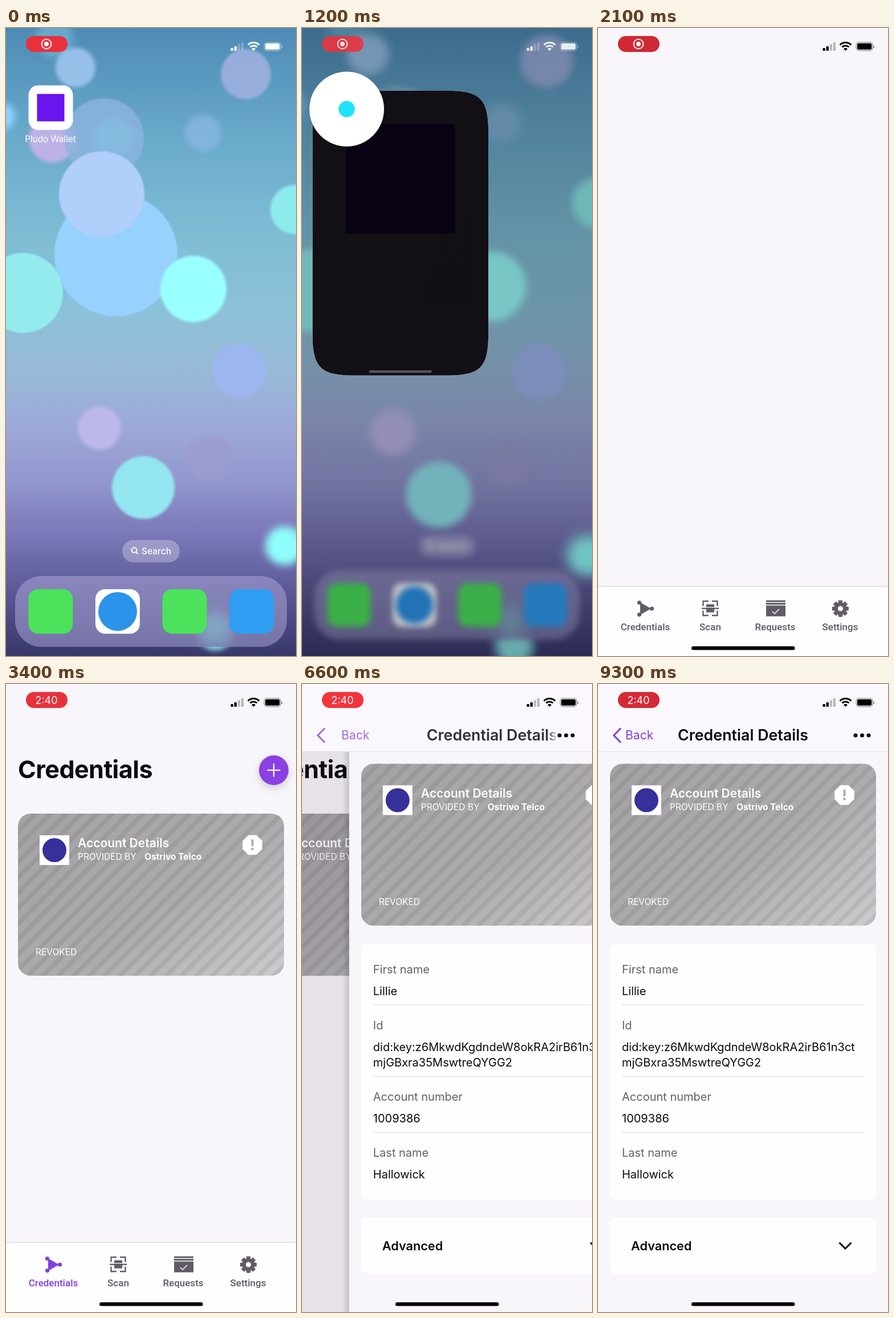
Animation of 509x1100 px, one loop 9400 ms. Source, as an HTML page with a canvas:

```html
<!DOCTYPE html>
<html lang="en">
<head>
<meta charset="utf-8">
<title>Wallet credential walkthrough</title>
<style>
html, body { margin: 0; width: 100%; height: 100%; overflow: hidden; }
canvas { display: block; }
</style>
</head>
<body>
<canvas id="stage" width="509" height="1100"></canvas>
<script>
const W = 509, H = 1100, LOOP = 9400, STEP = 100;
const c = document.getElementById('stage').getContext('2d');
const PURPLE = '#8040e0', INK = '#0d0a12', PAGE = '#f8f6fa', PANEL = '#fefdff', GREY = '#5f5c67';

const clamp = v => Math.max(0, Math.min(1, v));
const ramp = (t, a, b) => clamp((t - a) / (b - a));
const mix = (a, b, k) => a + (b - a) * k;
// Critically damped spring from 0 to 1; t in ms.
const spring = (t, start, k) => {
  const s = Math.max(0, t - start) / 1000 * k;
  return 1 - (1 + s) * Math.exp(-s);
};

function layer(draw, { x = 0, y = 0, scale = 1, alpha = 1 } = {}) {
  c.save();
  c.translate(x, y);
  c.scale(scale, scale);
  c.globalAlpha *= alpha;
  draw();
  c.restore();
}
const zoom = (k, draw) => layer(draw, { x: W / 2 * (1 - k), y: H / 2 * (1 - k), scale: k });

function box(x, y, w, h, fill, r = 0) {
  c.fillStyle = fill;
  c.beginPath();
  c.roundRect(x, y, w, h, r);
  c.fill();
}
function disc(x, y, r, fill) {
  c.fillStyle = fill;
  c.beginPath();
  c.arc(x, y, r, 0, 7);
  c.fill();
}
// Rectangle path with continuous-curvature corners.
function smoothRect(x, y, w, h, r) {
  const e = r * 1.528, n = e * .18, x2 = x + w, y2 = y + h;
  c.beginPath();
  c.moveTo(x + e, y);
  c.lineTo(x2 - e, y);
  c.bezierCurveTo(x2 - n, y, x2, y + n, x2, y + e);
  c.lineTo(x2, y2 - e);
  c.bezierCurveTo(x2, y2 - n, x2 - n, y2, x2 - e, y2);
  c.lineTo(x + e, y2);
  c.bezierCurveTo(x + n, y2, x, y2 - n, x, y2 - e);
  c.lineTo(x, y + e);
  c.bezierCurveTo(x, y + n, x + n, y, x + e, y);
}
function path(points, width, color, close) {
  c.beginPath();
  points.forEach(([x, y]) => c.lineTo(x, y));
  if (close) c.closePath();
  if (width) {
    c.lineWidth = width;
    c.strokeStyle = color;
    c.stroke();
  } else {
    c.fillStyle = color;
    c.fill();
  }
}
function text(s, x, y, size, color, { weight = 400, align = 'left', font = 'Inter', spacing = 0 } = {}) {
  c.font = `${weight} ${size}px ${font}, sans-serif`;
  c.textAlign = align;
  c.letterSpacing = spacing + 'px';
  c.fillStyle = color;
  c.fillText(s, x, y);
}
function gradient(x0, y0, x1, y1, ...stops) {
  const g = c.createLinearGradient(x0, y0, x1, y1);
  stops.forEach(([at, color]) => g.addColorStop(at, color));
  return g;
}

function statusBar(t, color) {
  const glow = .5 + .5 * Math.cos((t - 4800) / 1700 * 2 * Math.PI);
  box(35, 14, 73, 28, `rgb(${mix(205, 244, glow)},${mix(40, 52, glow)},${mix(51, 62, glow)})`, 14);
  if (t < 2900) {
    c.lineWidth = 1.9;
    c.strokeStyle = '#fff';
    c.beginPath();
    c.arc(71, 28, 8.4, 0, 7);
    c.stroke();
    disc(71, 28, 3.9, '#fff');
  } else {
    text('2:40', 71, 34.5, 18, '#fff', { align: 'center' });
  }
  [5, 8, 12, 15].forEach((h, i) => layer(
    () => box(394.5 + i * 6.1, 40 - h, 4.3, h, color, 1.2), { alpha: i < 2 ? 1 : .25 }));
  c.strokeStyle = color;
  c.lineWidth = 3;
  [14, 8.6].forEach(r => {
    c.beginPath();
    c.arc(434.5, 39.5, r, -Math.PI * .75, -Math.PI * .25);
    c.stroke();
  });
  c.fillStyle = color;
  c.beginPath();
  c.moveTo(434.5, 40);
  c.arc(434.5, 40, 5, -Math.PI * .75, -Math.PI * .25);
  c.fill();
  layer(() => {
    c.lineWidth = 1.2;
    c.beginPath();
    c.roundRect(453.3, 25, 28.7, 14.6, 4.2);
    c.stroke();
    box(483.3, 30, 1.7, 5, color, 1);
  }, { alpha: .45 });
  box(455, 26.8, 25.3, 11, color, 2.6);
}

const bubbles = [ // x, y, radius, softness, colour
  [85, 18, 33, 6, '#78bbd999'], [122, 69, 35, 3, '#a3c8f0d9'], [421, 81, 44, 2, '#a3b2e1d9'],
  [346, 184, 32, 5, '#8cb9e1b3'], [-8, 155, 24, 6, '#8fd0ff'], [82, 194, 42, 3, '#bcb2e6'],
  [172, 193, 70, 1, '#8db4dfcc'], [190, 192, 35, 5, '#86bde2cc'], [193, 397, 108, 1, '#97d1fd'],
  [168, 291, 75, 1, '#b0cffa'], [507, 318, 43, 2, '#8eebec'], [30, 464, 70, 1, '#94ebee'],
  [329, 457, 58, 2, '#9affff'], [409, 600, 47, 1, '#a0b6f2e0'], [164, 701, 38, 3, '#bdb8ea'],
  [357, 754, 40, 2, '#9d9cd0b0'], [241, 805, 55, 2, '#93e6f0'], [489, 907, 34, 7, '#8ffdfc'],
  [367, 1058, 32, 4, '#86dbe0']
];

function home(t, p) {
  box(0, 0, W, H, gradient(0, 0, 0, H, [0, '#4d8bb6'], [.17, '#69a9ca'], [.33, '#7fbdd5'],
    [.45, '#8cc1d9'], [.55, '#98b9d8'], [.63, '#9daad9'], [.72, '#9397cf'], [.82, '#7673b4'],
    [.9, '#5a5795'], [1, '#37376b']));
  zoom(1 + .09 * p, () => bubbles.forEach(([x, y, r, soft, color]) => {
    c.filter = `blur(${soft + 8 * p}px)`;
    disc(x, y, r, color);
  }));
  zoom(1 - .045 * p, () => {
    const blur = p ? `blur(${10 * p}px)` : 'none';
    c.filter = blur;
    box(204, 897, 101, 39, '#ffffff48', 19.5);
    c.strokeStyle = '#fff';
    c.lineWidth = 2;
    c.beginPath();
    c.arc(225, 914.5, 4.4, 0, 7);
    c.stroke();
    path([[228.3, 918], [232, 921.7]], 2.2, '#fff');
    text('Search', 238, 922, 15.5, '#fff', { weight: 500 });
    box(16, 960, 477, 124, gradient(0, 960, 0, 1084, [0, '#8d89c0ee'], [1, '#7a78aaee']), 46);
    c.filter = 'blur(16px)';
    disc(367, 1050, 26, '#86dbe088');
    c.filter = blur;
    ['#4ce25c', '#fff', '#4ce25c', '#2f9df2'].forEach((fill, i) =>
      box(39.3 + i * 117.6, 983, 78, 78, fill, 17));
    disc(196, 1022, 34, '#2c93ea');
    if (!p) {
      box(39.5, 100.5, 78, 78, '#fff', 17);
      box(54.5, 115.5, 48, 48, '#6a14ee');
      text('Pludo Wallet', 78, 200, 15.3, '#fff', { align: 'center' });
    }
  });
  layer(() => box(0, 0, W, H, '#000'), { alpha: .5 * p ** 1.3 });
}

function trianglePattern() {
  c.save();
  c.beginPath();
  c.rect(160, 355, 300.5, 402);
  c.clip();
  for (let row = 0; row < 12; row++) {
    for (let col = 0; col < 9; col++) {
      const x = 464.1 - col * 42 - (row % 2 ? 0 : 21), y = 369 + row * 36.4;
      c.globalAlpha = clamp(((x - 430) * 395 + (y - 350) * 270) / 478 / 430);
      disc(x, y, 2.2, '#444');
      for (const [dx, dy] of [[42, 0], [21, 36.4], [-21, 36.4]]) {
        path([[x + dx * .24, y + dy * .24], [x + dx * .76, y + dy * .76]], 1.8, '#444');
      }
    }
  }
  c.restore();
}

function appWindow(t, p) {
  const w = mix(78, W, p), h = mix(78, H, p ** 1.42);
  const x = mix(78.5, W / 2, p) - w / 2, y = mix(139.5, H / 2, p) - h / 2;
  const k = w / W, shown = ramp(t, 1200, 1450);
  c.save();
  smoothRect(x, y, w, h, p > .999 ? 0 : 17 + 44 * Math.sqrt(p));
  c.clip();
  box(x, y, w, h, '#fdfbff');
  layer(() => box(x + w * .19, y + w * .19, w * .62, w * .62, '#6a14ee'), { alpha: 1 - shown });
  layer(() => {
    trianglePattern();
    box(159, 454, 191, 191, '#6a14ee');
  }, { x, y: y + h / 2 - 550 * k, scale: k, alpha: shown });
  const dark = t < 1200 ? .94 * ramp(t, 1070, 1180) : .94 - .68 * ramp(t, 1250, 1600) - .26 * ramp(t, 1600, 1850);
  layer(() => box(x, y, w, h, '#040007'), { alpha: dark });
  box(x + w * .322, y + h - mix(0, 17, p), w * .356, mix(2, 6.5, p), t < 1400 ? '#56525a' : '#2b2631', 3);
  c.restore();
  if (t >= 1400) layer(() => statusBar(t, '#000'), { x, y: y - 1.5 * (1 - k), scale: k });
}

function card(y) {
  layer(() => {
    c.beginPath();
    c.roundRect(21, 0, 467, 284, 22);
    c.clip();
    box(21, 0, 467, 284, gradient(130, -30, 400, 330, [0, '#a5a3a6'], [.55, '#adabae'], [1, '#cbc9cc']));
    for (let x = 30; x < 800; x += 27) path([[x, -5], [x - 300, 295]], 8, '#00000012');
    box(59, 38, 52, 52, '#fff');
    disc(85, 64, 21, '#35309a');
    text('Account Details', 126, 59, 21, '#fff', { weight: 600 });
    text('PROVIDED BY', 126, 81, 15.5, '#fff');
    text('Ostrivo Telco', 243, 81, 15.5, '#fff', { weight: 700 });
    text('REVOKED', 52, 247.5, 15.5, '#fff');
    const octagon = [...Array(8).keys()].map(i => {
      const a = (i + .5) * Math.PI / 4;
      return [432.5 + 18.7 * Math.cos(a), 55 + 18.7 * Math.sin(a)];
    });
    path(octagon, 0, '#fff', true);
    box(430.6, 45, 3.8, 12.5, '#aaa8ab', 1.9);
    disc(432.5, 62, 2.3, '#aaa8ab');
  }, { y });
}

function listBody(t) {
  box(0, 0, W, H, PAGE);
  if (t < 2200) return;
  text('Credentials', 21, 165, 43, INK, { weight: 700, spacing: -.5 });
  c.save();
  c.shadowColor = '#0000002a';
  c.shadowBlur = 14;
  c.shadowOffsetY = 5;
  disc(470, 151, 26, '#8a40e2');
  c.restore();
  path([[458.5, 151], [481.5, 151]], 2.3, '#fff');
  path([[470, 139.5], [470, 162.5]], 2.3, '#fff');
  layer(() => card(227), { alpha: ramp(t, 2300, 2500) });
}

function tabBar(active) {
  const first = active ? PURPLE : GREY;
  box(0, 978, W, 122, PANEL);
  box(0, 977.5, W, 1.2, '#d6d3da');
  ['Credentials', 'Scan', 'Requests', 'Settings'].forEach((label, i) =>
    text(label, 83 + i * 114, 1055, 17, i ? GREY : first, { weight: 500, align: 'center', font: 'Roboto' }));

  path([[74, 1006], [74, 1028], [93, 1017]], 0, first, true);
  [[72.5, 1006.5], [72.5, 1027.5], [94.5, 1017]].forEach(([x, y]) => disc(x, y, 3.6, first));

  for (const sx of [-1, 1]) for (const sy of [-1, 1]) {
    path([[197 + sx * 3, 1016.5 + sy * 12.5], [197 + sx * 12.5, 1016.5 + sy * 12.5],
      [197 + sx * 12.5, 1016.5 + sy * 4]], 2.4, GREY);
  }
  box(190, 1009.5, 14, 14, GREY);
  box(182, 1015.5, 30, 2.4, GREY);
  box(190, 1014, 14, 1.2, PANEL);

  box(295, 1002.5, 34, 3, GREY);
  box(295, 1007, 34, 3, GREY);
  box(295, 1011.5, 34, 19, GREY);
  path([[306, 1022], [310, 1026], [318, 1018]], 1.5, '#fff');

  for (let i = 0; i < 8; i++) {
    c.save();
    c.translate(425.5, 1017);
    c.rotate(i * Math.PI / 4);
    box(-3.6, -14.5, 7.2, 8, GREY, 1);
    c.restore();
  }
  disc(425.5, 1017, 11, GREY);
  disc(425.5, 1017, 4.6, PANEL);
}

function field(label, y, ...values) {
  text(label, 42, y, 20, '#636068');
  values.forEach((value, i) => text(value, 42, y + 38 + i * 27, 20, INK));
}

function detailsBody() {
  box(0, 118, W, 982, PAGE);
  card(139.5);
  box(21, 455, 467, 448, PANEL, 9);
  field('First name', 507, 'Lillie');
  field('Id', 605, 'did:key:z6MkwdKgdndeW8okRA2irB61n3ct', 'mjGBxra35MswtreQYGG2');
  field('Account number', 730, '1009386');
  field('Last name', 828, 'Hallowick');
  [562, 687, 785].forEach(y => box(42, y - .5, 425, 1.3, '#e2e0e5'));
  box(21, 935, 467, 98, PANEL, 9);
  text('Advanced', 58, 992, 21.7, INK, { weight: 600 });
  path([[423.5, 978.5], [434, 989], [444.5, 978.5]], 3, INK);
}

function detailsHeader(p) {
  const rest = 1 - p;
  layer(() => {
    box(0, 0, W, 118, '#faf8fc');
    box(0, 117.8, W, 1.2, '#e3e0e7');
  }, { alpha: clamp(p * 3) });
  layer(() => {
    path([[40, 77.5], [27.8, 90], [40, 102.5]], 3.2, PURPLE);
    text('Back', 48 + rest * 129, 97, 21.2, PURPLE);
  }, { alpha: clamp(1 - rest * 1.5) });
  layer(() => {
    const shade = gradient(430, 0, 449, 0, [0, INK], [1, '#0d0a1200']);
    text('Credential Details', 254.5 + rest * 485, 99, 26.8, shade, { weight: 600, align: 'center' });
  }, { alpha: clamp(1 - rest) });
  layer(() => [452, 463.5, 475].forEach(x => disc(x, 90, 3.5, INK)), { alpha: clamp(p * 1.3) });
}

function app(t) {
  const p = spring(t, 6330, 12.1), edge = W * (1 - p);
  layer(() => listBody(t), { x: -W / 3 * p });
  if (!p) {
    tabBar(t >= 2200);
  } else {
    box(0, 0, W, H, `rgba(30,10,40,${.1 * p})`);
    if (edge > .5) box(edge - 12, 118, 12, 982, gradient(edge - 12, 0, edge, 0, [0, '#0000'], [1, '#00000026']));
    layer(detailsBody, { x: edge });
    detailsHeader(p);
  }
  box(164, 1083, 181.5, 6.5, '#050308', 3.2);
  statusBar(t, '#000');
}

function tap(t, start, x, y) {
  if (t < start || t > start + 500) return;
  disc(x, y, mix(14, 65.5, Math.sqrt(ramp(t, start, start + 400))), '#fff');
  disc(x, y, 14.3, '#20e2fa');
}

function render(t) {
  c.clearRect(0, 0, W, H);
  if (t < 2000) {
    const p = spring(t, 1070, 13.8);
    home(t, p);
    if (p) appWindow(t, p);
    if (t < 1400) layer(() => statusBar(t, '#fff'), { alpha: 1 - .25 * p });
  } else {
    app(t);
  }
  tap(t, 800, 78.5, 142);
  tap(t, 5700, 254, 337);
}

function frame(now) {
  render(Math.floor(now % LOOP / STEP) * STEP);
  requestAnimationFrame(frame);
}
requestAnimationFrame(frame);
</script>
</body>
</html>
```
